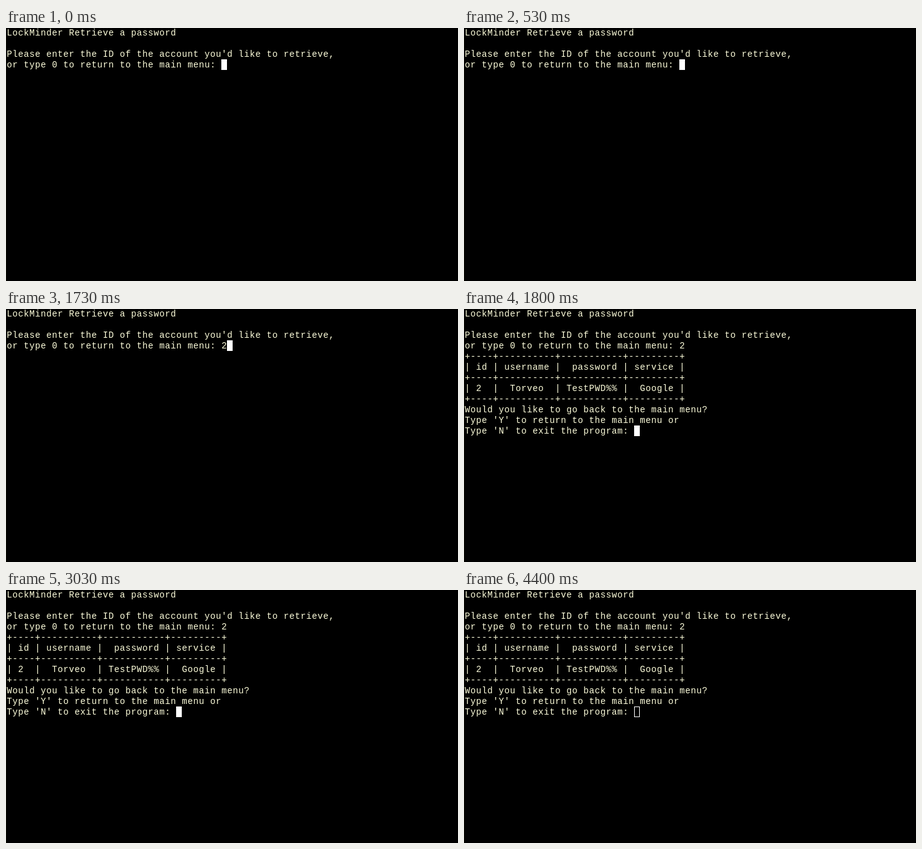
Write an HTML page with a canvas that moves like this. It is 720 px wide and 404 px high and loops after 4.43 s.

```html
<!DOCTYPE html>
<html lang="en">
<head>
<meta charset="utf-8">
<title>Terminal</title>
<style>
  html, body { margin: 0; width: 100%; height: 100%; overflow: hidden; background: #000; }
  canvas { display: block; }
</style>
</head>
<body>
<canvas id="screen" width="720" height="404"></canvas>
<script>
const ctx = document.getElementById("screen").getContext("2d");
const LOOP = 4430, TYPED = 830, ANSWERED = 1765, BLURRED = 4365;
const CELL = 9, ROW = 17, LEFT = 1, TOP = -1, FONT_SIZE = 14;
const INK = "#ffffdc", CURSOR = "#ffffff", EDGE = "#0a0a02";

const rule = "+" + [4, 10, 11, 9].map(n => "-".repeat(n)).join("+") + "+";
const prompt = [
  "LockMinder Retrieve a password",
  "",
  "Please enter the ID of the account you'd like to retrieve,",
  "or type 0 to return to the main menu: "
];
const answer = [
  rule,
  "| id | username |  password | service |",
  rule,
  "| 2  |  Torveo  | TestPWD%% |  Google |",
  rule,
  "Would you like to go back to the main menu?",
  "Type 'Y' to return to the main menu or",
  "Type 'N' to exit the program: "
];

function linesAt(t) {
  const lines = [...prompt];
  if (t >= TYPED) lines[lines.length - 1] += "2";
  return t >= ANSWERED ? lines.concat(answer) : lines;
}

// Each character sits centred in its own terminal cell.
function drawLine(line, row) {
  const y = TOP + row * ROW + 13;
  [...line].forEach((char, col) => ctx.fillText(char, LEFT + (col + 0.5) * CELL, y));
}

function drawCursor(col, row, focused) {
  const x = LEFT + col * CELL, y = TOP + row * ROW;
  ctx.fillStyle = ctx.strokeStyle = CURSOR;
  if (focused) ctx.fillRect(x, y, CELL, ROW);
  else ctx.strokeRect(x + 0.5, y + 0.5, CELL - 1, ROW - 1);
}

function draw(t) {
  ctx.fillStyle = "#000";
  ctx.fillRect(0, 0, 720, 404);
  ctx.fillStyle = EDGE;
  ctx.fillRect(0, 0, 1, 404);

  const lines = linesAt(t);
  ctx.font = `${FONT_SIZE}px "Liberation Mono", "Courier New", monospace`;
  ctx.textAlign = "center";
  ctx.textBaseline = "alphabetic";
  ctx.fillStyle = INK;
  lines.forEach(drawLine);

  const last = lines.length - 1;
  drawCursor(lines[last].length, last, t < BLURRED);
}

const start = performance.now();
function tick() {
  draw((performance.now() - start) % LOOP);
  requestAnimationFrame(tick);
}
tick();
</script>
</body>
</html>
```
